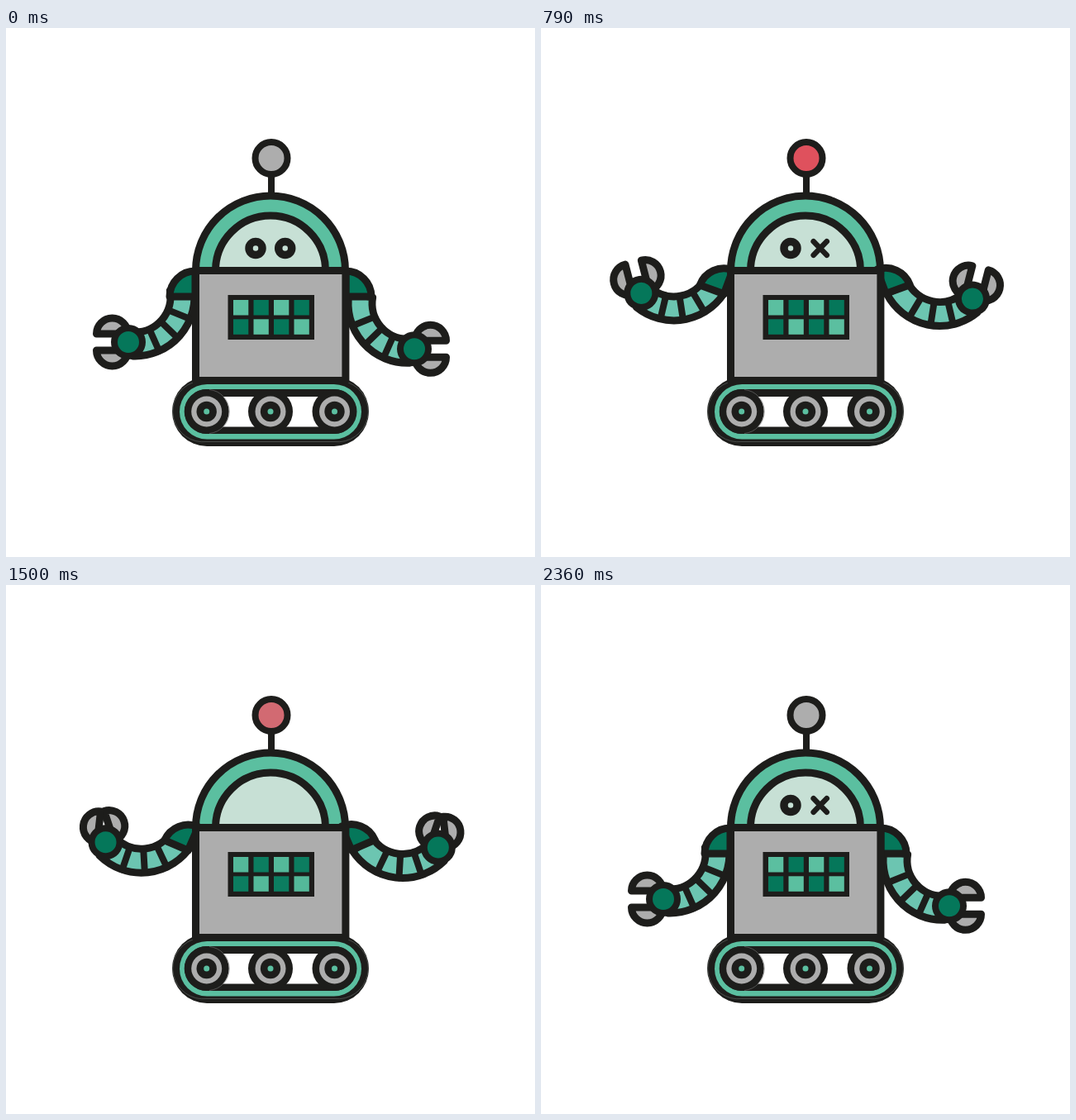
Animation of 640 by 640 pixels, one loop 2430 ms. Source, as an HTML page:

```html
<!DOCTYPE html>
<html lang="en">
<head>
<meta charset="utf-8">
<title>Robot</title>
<style>
  html, body { margin: 0; width: 100%; height: 100%; overflow: hidden; background: #fff; }
  svg { display: block; width: 100%; height: 100%; }
</style>
</head>
<body>
<svg id="stage" viewBox="0 0 640 640"></svg>
<script>
const INK = '#1d1d1b', GRAY = '#adadad', DARK = '#05775a', GREEN = '#5bbfa0',
      SLEEVE = '#6cc5b1', GLASS = '#c7e0d5';
const LOOP = 2430, FRAME = 1000 / 14, LAST = 33;
const stage = document.getElementById('stage');

function add(parent, tag, attrs) {
  const el = document.createElementNS('http://www.w3.org/2000/svg', tag);
  for (const key in attrs) el.setAttribute(key, attrs[key]);
  parent.appendChild(el);
  return el;
}
const group = (parent, attrs) => add(parent, 'g', attrs);
const circle = (parent, cx, cy, r, attrs) => add(parent, 'circle', { cx, cy, r, ...attrs });
const rect = (parent, x, y, width, height, attrs) =>
  add(parent, 'rect', { x, y, width, height, ...attrs });
const path = (parent, d, attrs) => add(parent, 'path', { d, ...attrs });
const line = (width, fill = 'none') => ({
  fill, stroke: INK, 'stroke-width': width,
  'stroke-linecap': 'round', 'stroke-linejoin': 'round'
});
const turn = (el, deg, x = 0, y = 0) =>
  el.setAttribute('transform', `rotate(${deg} ${x} ${y})`);

// Antenna and dome
path(stage, 'M321 178V202', line(8));
const bulb = circle(stage, 321, 157.5, 19.5, line(8));
path(stage, 'M229.5 293.5A90.5 90.5 0 0 1 410.5 293.5Z', line(9, GREEN));
path(stage, 'M253.5 293.5A66.5 66.5 0 0 1 386.5 293.5Z', line(9, GLASS));

// Eyes
function makeEye(x) {
  const eye = group(stage, { transform: `translate(${x} 266.5)` });
  return {
    O: circle(eye, 0, 0, 8, line(9.5)),
    X: path(eye, 'M-8-8.3L8 8.3M8-8.3L-8 8.3', line(6.6))
  };
}
const eyes = [makeEye(302), makeEye(337.7)];

// Arms are drawn for the left side; the right one is mirrored.
// The shoulder turns the whole arm, the elbow bends the sleeve, the wrist twists the claw.
function makeArm(side, pivotX, pivotY, shift) {
  const arm = group(side);
  const sleeve = group(group(arm, { transform: `translate(${shift})` }));
  const inner = 43, outer = 72;
  const at = (radius, deg) => {
    const a = deg * Math.PI / 180;
    return `${156 + radius * Math.cos(a)} ${325 + radius * Math.sin(a)}`;
  };
  path(sleeve, `M${at(outer, -10)}A${outer} ${outer} 0 0 1 ${at(outer, 92)}` +
    `L${at(inner, 92)}A${inner} ${inner} 0 0 0 ${at(inner, -10)}Z`, line(9, SLEEVE));
  for (const a of [22, 44, 66])
    path(sleeve, `M${at(inner, a)}L${at(outer, a)}`, line(8));

  const wrist = group(sleeve, { transform: 'translate(148 380)' });
  const claw = group(wrist);
  const jaws = [-1, 1].map(s => path(claw,
    `M-38.5 ${10 * s}A19 19 0 0 ${s < 0 ? 1 : 0} -0.5 ${10 * s}Z`, line(9, GRAY)));
  circle(wrist, 0, 0, 17, line(8, DARK));
  path(arm, 'M198 325A31 31 0 0 1 229 294V325Z', line(9, DARK));

  return (lift, twist, pinch) => {
    turn(arm, 30 * lift, pivotX, pivotY);
    turn(sleeve, 25 * lift, 213, 325);
    turn(claw, 45 * twist);
    turn(jaws[0], -12.5 * pinch, -2, -10);
    turn(jaws[1], 12.5 * pinch, -2, 10);
  };
}
const arms = [
  makeArm(group(stage), 234, 302, '0 0'),
  makeArm(group(stage, { transform: 'translate(640 0) scale(-1 1)' }), 236, 306, '-2 8.3')
];

// Tracks
rect(stage, 201, 422, 238, 84, { rx: 42, fill: INK });
path(stage, 'M226 429A37 37 0 0 0 243 500.5H397A37 37 0 0 0 414 429',
  { fill: 'none', stroke: '#5c605e', 'stroke-width': 0.7 });
rect(stage, 210, 431, 220, 66.5, { rx: 33.2, fill: GREEN });
rect(stage, 216, 437, 208, 54, { rx: 27, fill: INK });
rect(stage, 243, 446, 154, 36.5, { fill: '#fff' });
for (const x of [242.7, 320, 397.5]) {
  circle(stage, x, 464, 27, { fill: INK });
  circle(stage, x, 464, 18.5, { fill: GRAY });
  circle(stage, x, 464, 12.2, { fill: INK });
  circle(stage, x, 464, 3.5, { fill: GREEN });
}
path(stage, 'M246 437.5A26.6 26.6 0 0 1 246 490.5',
  { fill: 'none', stroke: '#777', 'stroke-width': 0.6 });

// Body and panel
rect(stage, 229.5, 293.5, 181.4, 133, line(9, GRAY));
rect(stage, 268.5, 323, 104.5, 54, { fill: INK });
const cells = [];
for (let i = 0; i < 8; i++) {
  const col = i % 4, row = i >> 2;
  cells.push({
    el: rect(stage, 275 + 24.5 * col, 329 + 23.3 * row, 18.3, 18.5),
    odd: (col + row) % 2
  });
}

const clamp = x => Math.min(1, Math.max(0, x));
const cubic = x => x < 0.5 ? 4 * x ** 3 : 1 - 4 * (1 - x) ** 3;
const smooth = x => x * x * (3 - 2 * x);
const ramp = (k, from, to) => smooth(clamp((k - from) / (to - from)));

// Smooth curve with a slow start; solves x(s) by bisection.
function liftEase(x) {
  let lo = 0, hi = 1;
  for (let i = 0; i < 24; i++) {
    const s = (lo + hi) / 2, q = 1 - s;
    if (3 * s * q * q * 0.52 + 3 * s * s * q * 0.66 + s ** 3 < x) lo = s;
    else hi = s;
  }
  return smooth(lo);
}

function mix(a, b, t) {
  const part = (c, i) => parseInt(c.slice(i, i + 2), 16);
  return `rgb(${[1, 3, 5].map(i =>
    Math.round(part(a, i) + (part(b, i) - part(a, i)) * t)).join()})`;
}

// Panel swaps its colours at each of these steps.
const swaps = [0, 5.5, 11, 16.5, 22, 25, 33];
function swapAt(k) {
  let i = 0;
  while (i < swaps.length - 2 && k >= swaps[i + 1]) i++;
  const t = ramp(k, swaps[i], swaps[i + 1]);
  return i % 2 ? 1 - t : t;
}

const looks = [[0, 'OO'], [9, 'OX'], [13, 'XO'], [18, '--'], [23, 'XX'], [29, 'OX']];

function draw(ms) {
  const k = Math.min(LAST, Math.floor((ms + 4) / FRAME));
  const half = LAST / 2;
  const up = Math.min(k, LAST - k) / half;
  const pinch = ramp(k, 15.5, 20.5) * (1 - ramp(k, 24, 32));
  for (const pose of arms) pose(liftEase(up), cubic(up), pinch);

  const beat = k % half;
  const glow = cubic(Math.min(beat, half - beat) / (half / 2));
  bulb.setAttribute('fill', mix(GRAY, '#e8414f', glow));

  const swap = swapAt(k);
  for (const { el, odd } of cells)
    el.setAttribute('fill', mix(GREEN, DARK, odd ? 1 - swap : swap));

  const look = looks.filter(([from]) => from <= k).pop()[1];
  eyes.forEach((eye, i) => {
    for (const kind of 'OX')
      eye[kind].setAttribute('visibility', look[i] === kind ? 'visible' : 'hidden');
  });
}

const start = performance.now();
function tick() {
  draw((performance.now() - start) % LOOP);
  requestAnimationFrame(tick);
}
tick();
</script>
</body>
</html>
```
